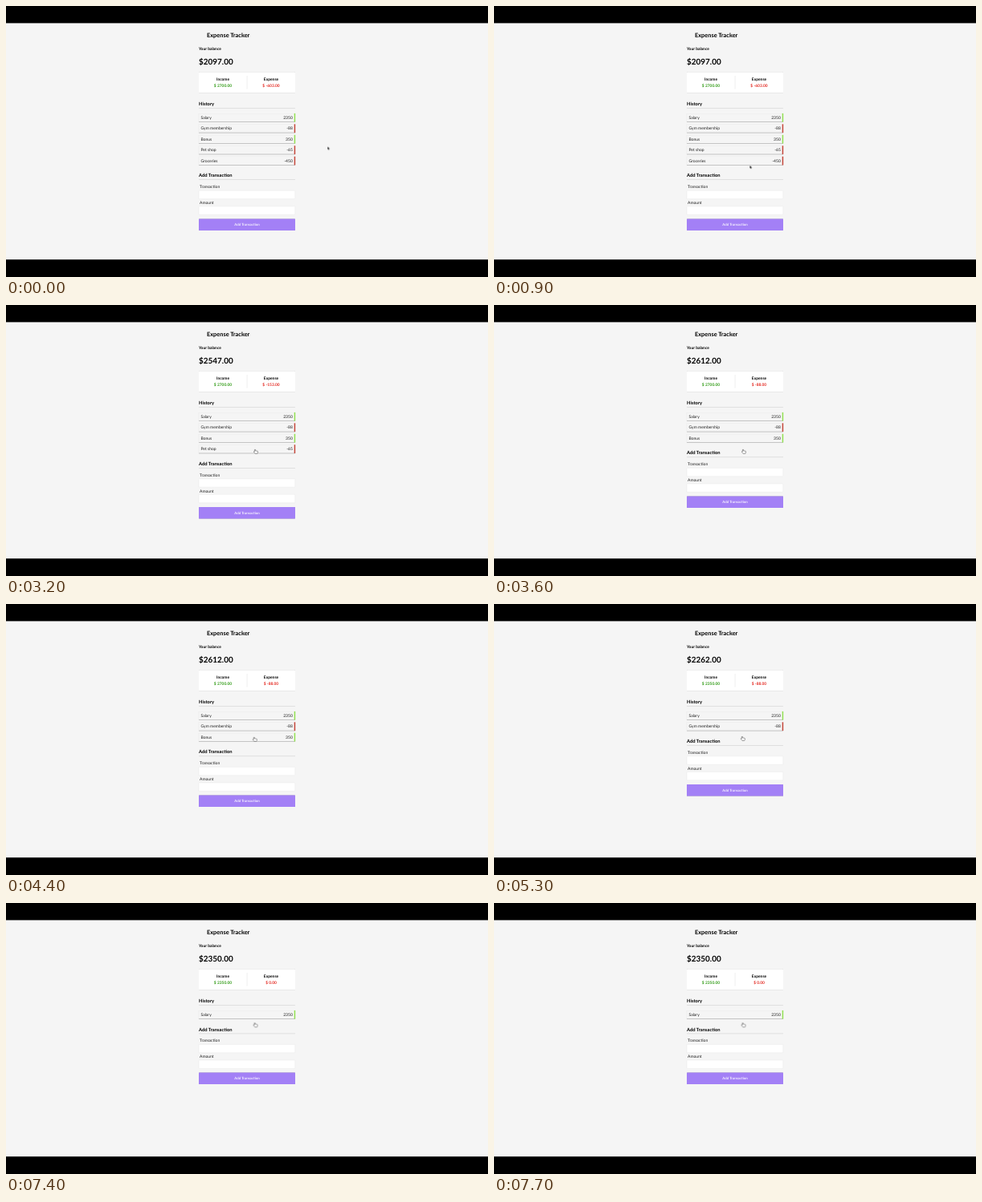
Animation of 600x338 px, one loop 8 s. Source, as an HTML page:

```html
<!DOCTYPE html>
<html lang="en">
<head>
<meta charset="utf-8">
<title>Expense Tracker</title>
<style>
html, body { margin: 0; width: 100%; height: 100%; overflow: hidden; background: #000; }
svg { display: block; width: 100vw; height: 100vh; }
text { font: 5px Lato, sans-serif; fill: #1c1c1c; text-rendering: geometricPrecision; }
.b { font-weight: 700; fill: #000; }
.h2 { font-size: 7.4px; }
.h3 { font-size: 5.8px; }
.h4 { font-size: 4.92px; }
.h1 { font-size: 9.95px; }
.mid { text-anchor: middle; }
.end { text-anchor: end; }
.plus { fill: #2f9a14; }
.minus { fill: #e3271f; }
.rule { fill: #c6c6c6; }
.field { fill: #fff; stroke: #e1e1e1; stroke-width: .35; }
.card { filter: drop-shadow(0 .35px .5px rgba(0,0,0,.32)); }
.in { fill: #92e052; }
.out { fill: #c4463a; }
.edge { fill: #a9a9a9; }
.side { fill: #dedede; }

.s0, .s1, .s2, .s3, .s4, .u1, .u2, .u3, .form, .arrow, .hand {
  animation: 8s step-end infinite;
}
.s0 { animation-name: u0; }
.s1 { animation-name: s1; }
.s2 { animation-name: s2; }
.s3 { animation-name: s3; }
.s4 { animation-name: s4; }
.u1 { animation-name: u1; }
.u2 { animation-name: u2; }
.u3 { animation-name: u3; }
.form { animation-name: lift; }
.arrow { animation-name: arrow; }
.hand { animation-name: hand; }
.cursor { animation: move 8s linear infinite; }

/* visible until an item is removed */
@keyframes u0 { 0% { opacity: 1 } 23.75%, to { opacity: 0 } }
@keyframes u1 { 0% { opacity: 1 } 45%, to { opacity: 0 } }
@keyframes u2 { 0% { opacity: 1 } 66.25%, to { opacity: 0 } }
@keyframes u3 { 0% { opacity: 1 } 92.5%, to { opacity: 0 } }
/* visible between two removals */
@keyframes s1 { 0% { opacity: 0 } 23.75% { opacity: 1 } 45%, to { opacity: 0 } }
@keyframes s2 { 0% { opacity: 0 } 45% { opacity: 1 } 66.25%, to { opacity: 0 } }
@keyframes s3 { 0% { opacity: 0 } 66.25% { opacity: 1 } 92.5%, to { opacity: 0 } }
@keyframes s4 { 0% { opacity: 0 } 92.5%, to { opacity: 1 } }
@keyframes lift {
  0% { transform: translateY(0) }
  23.75% { transform: translateY(-13.45px) }
  45% { transform: translateY(-26.9px) }
  66.25% { transform: translateY(-40.35px) }
  92.5%, to { transform: translateY(-53.8px) }
}
@keyframes arrow { 0% { opacity: 1 } 12.5%, to { opacity: 0 } }
@keyframes hand { 0% { opacity: 0 } 12.5%, to { opacity: 1 } }
@keyframes move {
  0% { transform: translate(400.3px, 175.4px); animation-timing-function: steps(9) }
  11.25% { transform: translate(318.4px, 198.9px); animation-timing-function: steps(3) }
  15%, 31.25% { transform: translate(311.6px, 191px); animation-timing-function: steps(7) }
  40%, 48.75% { transform: translate(310px, 179.9px); animation-timing-function: steps(5) }
  55%, 65% { transform: translate(308.8px, 165.9px); animation-timing-function: steps(9) }
  76.25% { transform: translate(309.4px, 157.5px); animation-timing-function: steps(2) }
  78.75%, to { transform: translate(309.6px, 149.3px) }
}
</style>
</head>
<body>
<svg viewBox="0 0 600 338" preserveAspectRatio="none">
  <defs>
    <g id="line">
      <rect class="side" x="239.8" y="134.2" width=".3" height="10.2"/>
      <rect class="side" x="240" y="134" width="118.7" height=".25"/>
      <rect class="edge" x="240" y="144.3" width="120" height=".65"/>
    </g>
  </defs>
  <rect width="600" height="338"/>
  <rect y="21.4" width="600" height="294.8" fill="#f5f5f5"/>

  <text class="b h2" x="250" y="38.6">Expense Tracker</text>
  <text class="b h4" x="240" y="55.3">Your balance</text>

  <rect class="card" x="240" y="82.2" width="120" height="26" rx=".5" fill="#fff"/>
  <rect x="299.85" y="87" width=".35" height="16.6" fill="#cfcfcf"/>
  <text class="b h4 mid" x="270" y="93.4">Income</text>
  <text class="b h4 mid" x="330" y="93.4">Expense</text>

  <g id="totals"></g>

  <text class="b h3" x="240" y="123.8">History</text>
  <rect class="rule" x="240" y="127.1" width="120" height=".45"/>
  <g id="rows"></g>

  <g class="form">
    <text class="b h3" x="240" y="213.4">Add Transaction</text>
    <rect class="rule" x="240" y="216.5" width="120" height=".45"/>
    <text x="241" y="227.2">Transaction</text>
    <rect class="field" x="240" y="230.2" width="119.8" height="10.4" rx=".4"/>
    <text x="241" y="247">Amount</text>
    <rect class="field" x="240" y="249.8" width="119.8" height="10.4" rx=".4"/>
    <rect class="card" x="240" y="265.4" width="120" height="14.5" rx=".6" fill="#a380f6"/>
    <text class="mid" x="300" y="274.2" style="font-size:4.4px;font-weight:700;fill:#f4efff">Add Transaction</text>
  </g>

  <g class="cursor">
    <path class="arrow" d="M0 0V3.7L.9 2.9 1.5 4.2 2.2 3.9 1.6 2.6H2.8Z" fill="#000" stroke="#fff" stroke-width=".25"/>
    <path class="hand" d="M-.6 .5Q0 -.3 .6 .5V2Q1.3 1.6 1.7 2.1 2.3 1.8 2.7 2.4 3.5 2.2 3.5 3V3.9Q3.4 4.6 2.9 5.4H.1Q-.6 4.4-1.7 3.3-1.8 2.4-.6 3Z" fill="#fff" stroke="#222" stroke-width=".45" stroke-linejoin="round"/>
  </g>
</svg>
<script>
const totals = [
  ["2097", "2700", "-603"],
  ["2547", "2700", "-153"],
  ["2612", "2700", "-88"],
  ["2262", "2350", "-88"],
  ["2350", "2350", "0"]
];
// name, amount, class that ends its visibility
const rows = [
  ["Salary", 2350, ""],
  ["Gym membership", -88, "u3"],
  ["Bonus", 350, "u2"],
  ["Pet shop", -65, "u1"],
  ["Groceries", -450, "s0"]
];
const pitch = 13.45;
const fill = (id, list, draw) => {
  document.getElementById(id).innerHTML = list.map(draw).join("");
};

fill("totals", totals, ([sum, plus, minus], i) => `<g class="s${i}">
  <text class="b h1" x="240" y="72.5">$${sum}.00</text>
  <text class="b h4 mid plus" x="270" y="100.9">$ ${plus}.00</text>
  <text class="b h4 mid minus" x="330" y="100.9">$ ${minus}.00</text></g>`);

fill("rows", rows, ([name, amount, until], i) => `<g class="${until}">
  <g transform="translate(0 ${i * pitch})"><use href="#line"/>
  <rect class="${amount < 0 ? "out" : "in"}" x="358.7" y="133.9" width="1.5" height="10.7"/>
  <text x="242.5" y="140.8">${name}</text>
  <text class="end" x="356.8" y="140.8">${amount}</text></g></g>`);
</script>
</body>
</html>
```
